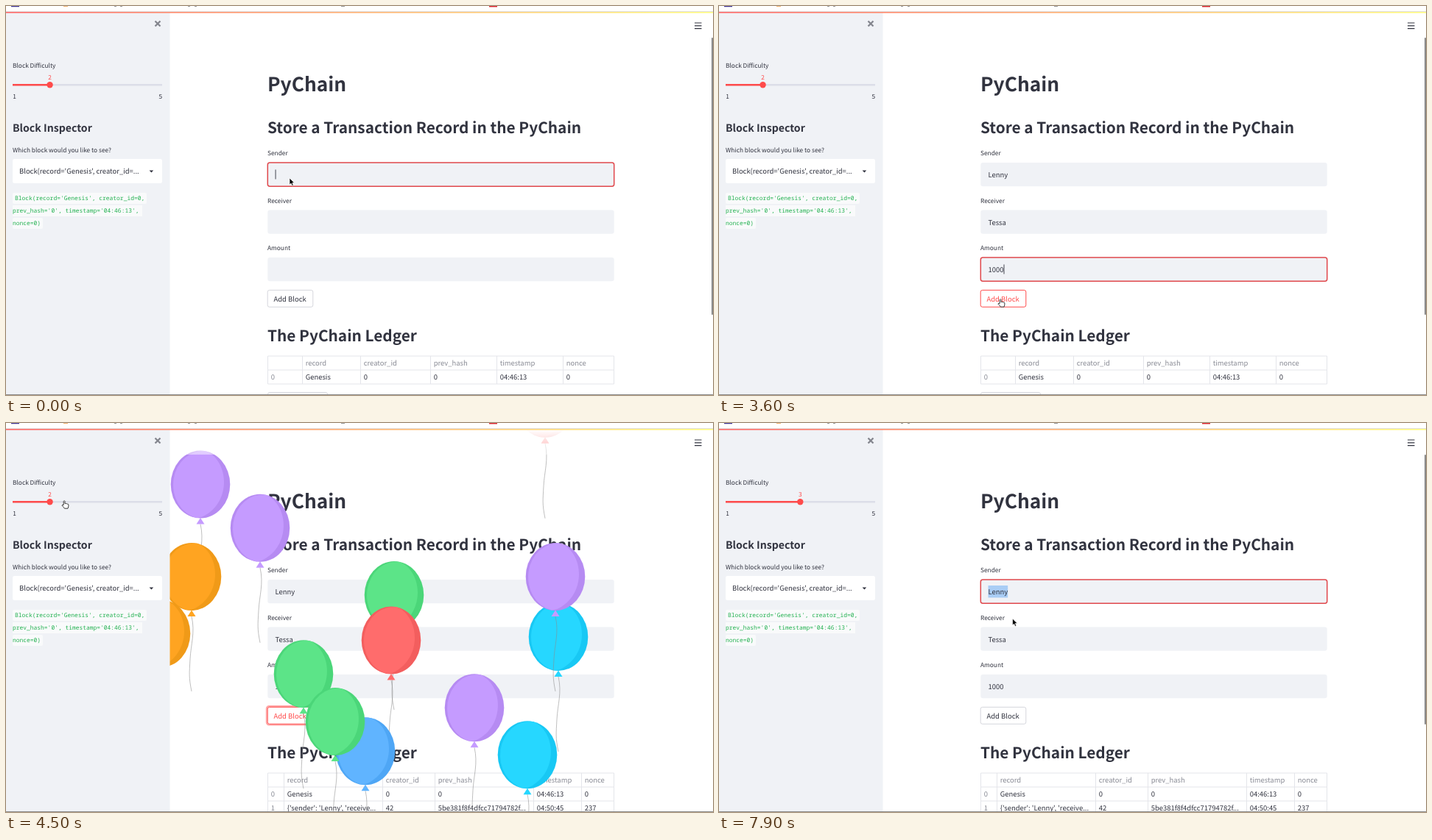
An HTML page for the animation above (8 s loop, 960 by 529 pixels).

```html
<!DOCTYPE html>
<html lang="en">
<head>
<meta charset="utf-8">
<title>PyChain</title>
<style>
  html, body { margin: 0; width: 100%; height: 100%; overflow: hidden; background: #fff; }
  svg { display: block; width: 100vw; height: 100vh; }
  text {
    font: 9.45px "Noto Sans CJK JP", "Noto Sans CJK SC", "Noto Sans CJK", "Open Sans", sans-serif;
    fill: #31333f;
    text-rendering: geometricPrecision;
  }
  .h1 { font-size: 26.3px; font-weight: 700; }
  .h2 { font-size: 20.8px; font-weight: 700; }
  .h3 { font-size: 14.1px; font-weight: 700; }
  .label { font-size: 8.33px; }
  .hint { font-size: 8.33px; fill: #83858f; text-anchor: end; }
  .code { font: 7.95px "Noto Sans Mono", "DejaVu Sans Mono", monospace; fill: #21b04f; }
  .chip { fill: #f9fafb; }
  .muted { fill: #888a94; }
  .red { fill: #ff4b4b; }
  .panel { fill: #f0f2f6; }
  .field { fill: #f0f2f6; stroke-width: 1.5; }
  .field.focus { stroke: #e0484c; }
  .grid { fill: none; stroke: #e4e5ea; }
  .button { fill: #fff; stroke: #d5d6dc; }
  .hot .button { stroke: #ff4b4b; }
  .hot text { fill: #ff4b4b; }
</style>
</head>
<body>
<svg viewBox="0 0 960 529" preserveAspectRatio="none">
  <defs>
    <linearGradient id="stripe"><stop stop-color="#ff6868"/><stop offset="1" stop-color="#fffd80"/></linearGradient>
    <linearGradient id="veil" x2="0" y2="1">
      <stop stop-color="#fff"/><stop offset=".3" stop-color="#fff" stop-opacity=".85"/>
      <stop offset="1" stop-color="#fff" stop-opacity=".45"/>
    </linearGradient>
  </defs>
  <rect width="960" height="529" fill="#fff"/>

  <text class="h1" x="355" y="116">PyChain</text>
  <text class="h2" x="355" y="172.5">Store a Transaction Record in the PyChain</text>
  <g id="fields"></g>
  <text class="hint" id="hint" x="822"></text>
  <rect id="caret" width=".9" height="13" fill="#31333f"/>
  <g id="add">
    <rect id="ring" x="353.8" y="385" width="64.4" height="25.6" rx="3.5" fill="none" stroke="#ffa5a5" stroke-width="2"/>
    <rect class="button" x="355.2" y="386.4" width="61.6" height="22.9" rx="2.5"/>
    <text x="363.5" y="401.6">Add Block</text>
  </g>
  <text class="h2" x="355" y="456">The PyChain Ledger</text>
  <g id="tables"></g>

  <g id="balloons"></g>
  <rect x="222" y="9" width="736" height="34" fill="url(#veil)"/>
  <path d="M935 23h9.5M935 26.8h9.5M935 30.6h9.5" stroke="#31333f" stroke-width="1.2"/>

  <rect class="panel" y="9" width="222.5" height="520"/>
  <path d="M202.5 20.5l7 7m0-7l-7 7" stroke="#84868e" stroke-width="2.3"/>
  <text class="label" x="9" y="84">Block Difficulty</text>
  <path d="M9 107.3H212" stroke="#dcdee8" stroke-width="2.6"/>
  <path id="range" stroke="#ff4b4b" stroke-width="2.6"/>
  <circle id="halo" cy="107.3" r="6" fill="#ff4b4b" opacity=".5"/>
  <circle id="thumb" class="red" cy="107.3" r="4.2"/>
  <text id="value" class="label red" y="99.8" text-anchor="middle"></text>
  <text class="label" x="9.2" y="126">1</text>
  <text class="label" x="212" y="126" text-anchor="end">5</text>
  <text class="h3" x="9" y="171">Block Inspector</text>
  <text class="label" x="9" y="198.5">Which block would you like to see?</text>
  <rect x="9" y="208" width="203" height="33" rx="2.5" fill="#fff"/>
  <text x="18" y="228.3">Block(record='Genesis', creator_id=...</text>
  <path d="M194.6 223.6h5.6l-2.8 3z" fill="#31333f"/>
  <rect class="chip" x="9" y="254" width="182" height="15" rx="2"/>
  <rect class="chip" x="9" y="271" width="176" height="15"/>
  <rect class="chip" x="9" y="288" width="41" height="15" rx="2"/>
  <text class="code" x="12" y="263.8">Block(record='Genesis', creator_id=0,</text>
  <text class="code" x="9" y="281">prev_hash='0', timestamp='04:46:13',</text>
  <text class="code" x="9" y="298">nonce=0)</text>

  <rect width="960" height="8" fill="#fff"/>
  <path d="M7 0h11v1.2H7z" fill="#3f3391"/>
  <path d="M78 0h6v.8h-6z" fill="#f0a04b"/>
  <path d="M656 0h11v1.4h-11z" fill="#d8232a"/>
  <path d="M147 0h3v.8h-3zM155 0h3v.8h-3zM247 0h3v.8h-3zM256 0h3v.8h-3zM455 0h5v.8h-5z" fill="#777"/>
  <rect y="7" width="960" height="1" fill="#e0dedf"/>
  <rect y="8" width="960" height="1.6" fill="url(#stripe)"/>
  <rect id="scroll" x="958" y="43" width="2" rx="1" fill="#8c8c8c"/>
  <rect y="528" width="960" height="1" fill="#8d8d8d"/>

  <g id="arrow" stroke="#fff" stroke-width=".7">
    <path d="M0 0V9l2.1-1.8 1.5 3.2 1.6-.7-1.4-3.1h2.8z" fill="#000"/>
  </g>
  <g id="hand" stroke="#222" stroke-width=".9" stroke-linejoin="round">
    <path d="M-.8 1.5Q.2-.4 1 1.5V4.6q1-.8 1.7.2 1-.6 1.6.4 1.3-.4 1.6 1 .2 2.8-.9 5H.4Q-.6 9.4-3 7.2-2.6 5.4-.8 6.6z" fill="#fff"/>
  </g>
  <g id="beam" stroke="#333" stroke-width=".9" fill="none">
    <path d="M-2-4.5q2 0 2 1.2v6.6q0 1.2 2 1.2M2-4.5q-2 0-2 1.2v6.6q0 1.2-2 1.2"/>
  </g>
</svg>
<script>
const LOOP = 8000, STEP = 100;
const $ = id => document.getElementById(id);
const show = (el, on) => el.style.display = on ? "" : "none";

function add(parent, tag, attrs, text = "") {
  const el = document.createElementNS("http://www.w3.org/2000/svg", tag);
  set(el, attrs);
  el.textContent = text;
  return parent.appendChild(el);
}
function set(el, attrs) {
  for (const key in attrs) el.setAttribute(key, attrs[key]);
}

// Form
const fields = ["Sender", "Receiver", "Amount"].map((name, i) => {
  const top = 213 + i * 64.5, group = $("fields");
  add(group, "text", { class: "label", x: 355, y: top - 9.8 }, name);
  return {
    top,
    box: add(group, "rect", { class: "field", x: 355.3, y: top, width: 470.4, height: 32.3, rx: 3 }),
    mark: add(group, "rect", { x: 365.5, y: top + 8, height: 16.5, fill: "#a9cdf5" }),
    text: add(group, "text", { x: 365.5, y: top + 20.2 })
  };
});

// Ledger, before and after the new block
function table(columns, rows) {
  const group = add($("tables"), "g", {});
  const bottom = 476 + rows.length * 19;
  let d = columns.map(x => `M${x} 476V${bottom}`).join("");
  rows.forEach((cells, r) => {
    d += `M355.5 ${476 + r * 19}H825.5`;
    cells.forEach((cell, c) => add(group, "text", {
      x: columns[c] + 4.2, y: 489 + r * 19, class: r && c ? "" : "muted"
    }, cell));
  });
  add(group, "path", { class: "grid", d: d + `M355.5 ${bottom}H825.5` });
  return group;
}
const head = ["", "record", "creator_id", "prev_hash", "timestamp", "nonce"];
const genesis = ["0", "Genesis", "0", "0", "04:46:13", "0"];
const shortTable = table([355.5, 402.5, 481.5, 576.5, 666.5, 756.5, 825.5], [head, genesis]);
add(shortTable, "rect", { class: "button", x: 355.5, y: 525.5, width: 81, height: 23, rx: 2.5 });
const longTable = table([355.5, 377.5, 511.5, 582.5, 716.5, 781.5, 825.5], [head, genesis,
  ["1", "{'sender': 'Lenny', 'receive...", "42", "5be381f8f4dfcc71794782f...", "04:50:45", "237"]]);

// Balloons: colour, x and launch time, back to front
const colors = {
  cyan: ["#26d7ff", "#18c8f4"], green: ["#5ce488", "#4bd679"], orange: ["#ffa421", "#f09a18"],
  blue: ["#60b4ff", "#4ea6f5"], red: ["#ff6c6c", "#f35e5e"], purple: ["#c59bff", "#b68bf2"]
};
const balloons = [
  ["green", 471, 3917], ["green", 456, 3895], ["orange", 461, 3908], ["orange", 319, 3885],
  ["green", 283, 3849], ["purple", 659, 3935], ["cyan", 415, 3816], ["blue", 533, 3900],
  ["cyan", 533, 3955], ["cyan", 623, 3948], ["red", 658, 3998], ["red", 417, 3991],
  ["red", 414, 3953], ["purple", 749, 4032], ["cyan", 749, 3900], ["blue", 736, 3984],
  ["red", 732, 4095], ["purple", 264, 4131], ["purple", 345, 4152], ["orange", 210, 4209],
  ["orange", 252, 4177], ["cyan", 750, 4211], ["purple", 746, 4177], ["green", 527, 4187],
  ["red", 523, 4213], ["blue", 488, 4290], ["green", 404, 4234], ["purple", 636, 4257],
  ["green", 447, 4267], ["cyan", 708, 4293]
].map(([color, x, start]) => {
  const [light, dark] = colors[color], el = add($("balloons"), "g", {});
  add(el, "path", { d: "M0 54C5 76-1 92-2 112S-4 136 0 156", fill: "none", stroke: "#8a8a8a", "stroke-width": .55 });
  add(el, "path", { d: "M0 45.5L5.5 54H-5.5Z", fill: light });
  add(el, "ellipse", { rx: 40.3, ry: 46, fill: dark });
  add(el, "path", { d: "M8-45.1C38-32 42 20 8 41Q2 45-5 45.6A40.3 46 0 0 1 8-45.1Z", fill: light });
  return { el, x, start };
});

// Pointer: time, x, y, shape until the next key
const pointerKeys = [
  [0, 385, 234, "arrow"], [100, 385, 234, ""], [3000, 400, 300, "beam"],
  [3300, 388, 380, "arrow"], [3500, 382, 398, "hand"], [4100, 382, 398, "hand"],
  [4200, 310, 325, "arrow"], [4300, 222, 244, "arrow"], [4400, 130, 160, "arrow"],
  [4500, 79, 105, "hand"], [4900, 59, 105, "hand"], [5300, 89, 107, "hand"],
  [5700, 60, 106, "hand"], [6300, 110, 107, "hand"], [6600, 109, 106, "hand"],
  [6800, 220, 160, "arrow"], [7100, 400, 231, "beam"], [7700, 400, 231, "beam"],
  [7800, 398.5, 246, "arrow"], [7900, 398.5, 266, "arrow"], [LOOP, 398.5, 266, ""]
];
function drawPointer(t) {
  const i = pointerKeys.findIndex(key => key[0] > t) - 1;
  const [t0, x0, y0, shape] = pointerKeys[i], [t1, x1, y1] = pointerKeys[i + 1];
  const p = (t - t0) / (t1 - t0);
  for (const id of ["arrow", "hand", "beam"]) show($(id), id === shape);
  if (shape) set($(shape), { transform: `translate(${x0 + (x1 - x0) * p} ${y0 + (y1 - y0) * p})` });
}

const typed = (word, t, start) => word.slice(0, Math.max(0, Math.floor((t - start) / STEP) + 1));

function drawForm(t) {
  const focus = t < 1200 ? 0 : t < 2200 ? 1 : t < 3700 ? 2 : t >= 7200 ? 0 : -1;
  const selected = t >= 7300;
  const values = [t < 1000 ? typed("Lenn", t, 100) : "Lenny", typed("Tessa", t, 1500), typed("1000", t, 2500)];
  fields.forEach((field, i) => {
    field.text.textContent = values[i];
    field.box.classList.toggle("focus", i === focus);
    const marked = selected && i === focus;
    show(field.mark, marked);
    if (marked) set(field.mark, { width: field.text.getComputedTextLength() });
  });

  const active = fields[focus], blinkOff = t >= 600 && t < 800;
  show($("caret"), active && !selected && !blinkOff);
  if (active) {
    set($("caret"), { x: 365.6 + active.text.getComputedTextLength(), y: active.top + 9.5 });
    set($("hint"), { y: active.top + 29 });
  }
  $("hint").textContent = active && values[focus] && t < 3000 ? "Press Enter to apply" : "";

  $("add").classList.toggle("hot", t >= 3500 && t < 4800);
  show($("ring"), t >= 3700 && t < 4800);
  show(shortTable, t < 3900);
  show(longTable, t >= 3900);
}

function drawSlider(t) {
  const value = t < 6200 ? 2 : 3, x = 8.8 + (value - 1) * 50.75;
  $("value").textContent = value;
  set($("value"), { x });
  set($("thumb"), { cx: x });
  set($("halo"), { cx: x });
  set($("range"), { d: `M9 107.3H${x}` });
  show($("halo"), t >= 4800 && t < 7200);
}

function drawBalloons(t) {
  for (const { el, x, start } of balloons) {
    const age = (t - start) / 1000, y = 620 - 3940 * age * age;
    show(el, age > 0 && y > -160);
    set(el, { transform: `translate(${x} ${y})` });
  }
}

function drawScrollbar(t) {
  const fade = t < 6700 ? Math.min(1, Math.max(0, (4500 - t) / 300)) : 1;
  set($("scroll"), { height: t < 3900 ? 377 : 367, opacity: fade });
}

function render() {
  const t = Math.floor(performance.now() % LOOP / STEP) * STEP;
  drawForm(t);
  drawSlider(t);
  drawBalloons(t);
  drawPointer(t);
  drawScrollbar(t);
  requestAnimationFrame(render);
}
render();
</script>
</body>
</html>
```
